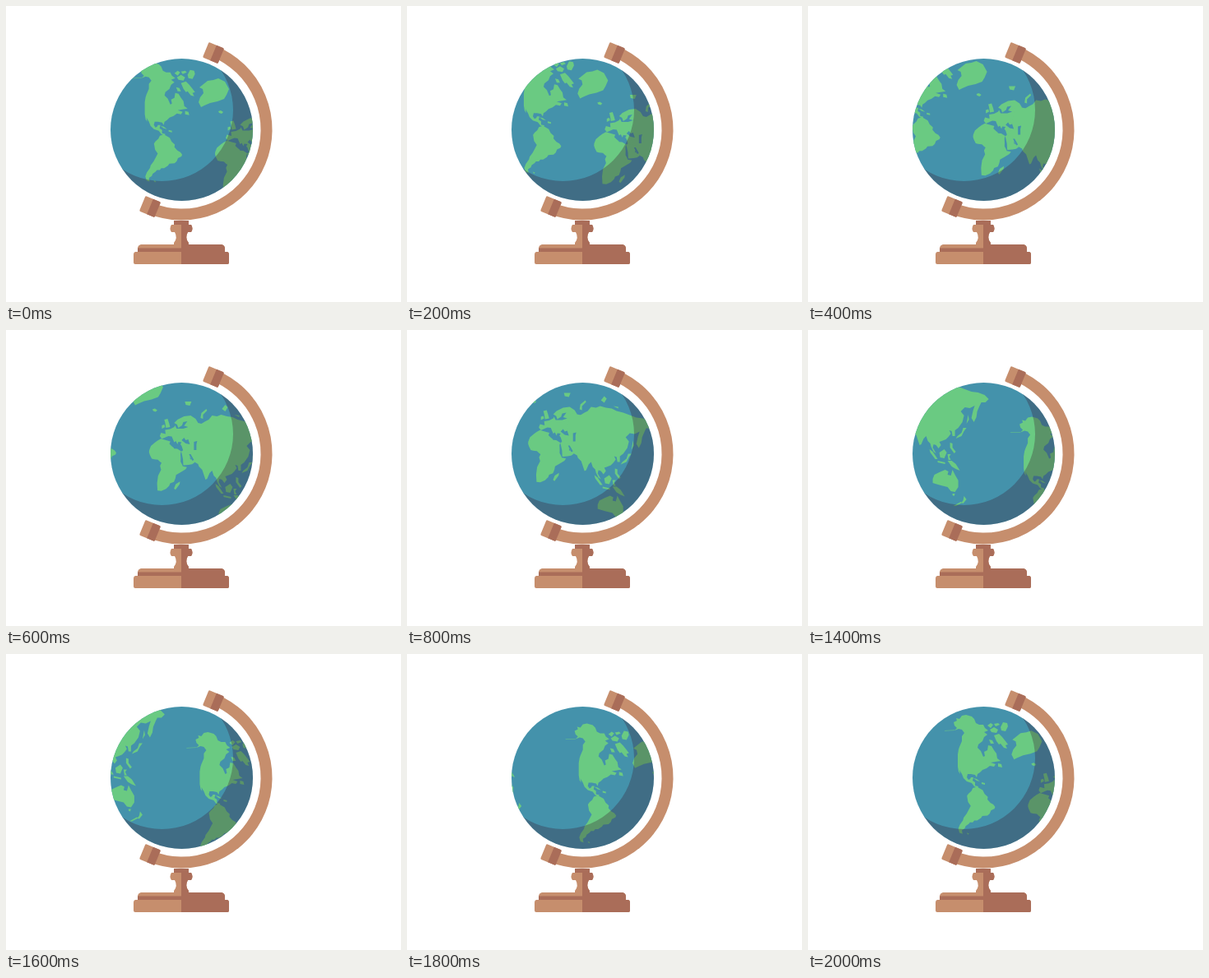
Write an HTML page that moves like this. It is 480 px wide and 360 px high and loops after 2100 ms.

```html
<!DOCTYPE html>
<html lang="en">
<head>
<meta charset="utf-8">
<title>Spinning globe</title>
<style>
html, body { margin: 0; width: 100%; height: 100%; overflow: hidden; background: #fff; }
svg { display: block; width: 480px; height: 360px; }
.sea { fill: #4492ab; }
.land { fill: #6aca82; }
.light { fill: #c68e6d; }
.dark { fill: #aa6d59; }
</style>
</head>
<body>
<svg viewBox="0 0 480 360">
  <defs>
    <clipPath id="ball"><circle cx="213.5" cy="150.5" r="86.5"/></clipPath>
    <clipPath id="right"><rect x="213" y="255" width="70" height="70"/></clipPath>
    <g id="cap">
      <rect class="light" x="-10" y="-10" width="20" height="20" rx="1.5"/>
      <path class="dark" d="M0-10H8.5Q10-10 10-8.5V8.5Q10 10 8.5 10H0Z"/>
    </g>
    <path id="stand" d="M204 261H222V266H225Q228 270.500 225 275H221Q217 282 222 288V290H262Q266 291 266 295V299H269Q271 299.500 271 302V312Q271 314 269 314H157Q155 314 155 312V302Q155 299.500 157 299H160V295Q160 291 164 290H204V288Q209 282 205 275H201Q198 270.500 201 266H204Z"/>

    <!-- data-step: the step at which a group needs no offset -->
    <g id="map" class="land">
      <g data-step="0">
        <!-- South America, in degrees -->
        <path transform="matrix(.744 .293 .3 -.763 241.9 186.4)" d="M-77 8L-72 12-62 10.500-57 6-51 4-50 0-44-3-39-3.500-35-6-35-9-39-13-39-18-41-22-48-25.500-49-29-53-34.500-57-36-58-39.500-62-41-63-44-66-48.500-66-52-69-56-68-58-66-61-71-61-75-56-75-50-73-42-73.500-38-71.500-31-70-18-76-14-81-6-80-2-77.500 3ZM-61-57L-57-57-58-59Z"/>
        <!-- Greenland, Iceland -->
        <path d="M240 95L245 91 252 90 258 88 266 92 271 101 268 108 265 113 257 116 248 118 241 121 237 123 234 117 236 111 240 106 239 101 235 99ZM258 128L261 127 264 129 262 131 259 130Z"/>
      </g>
      <g data-step="20">
        <!-- North America -->
        <path d="M177 83L181 81 180 78 184 79 187 75 192 74 199 76 202 79 204 84 208 86 213 86 215 90 219 93 214 95 218 98 214 101 212 106 207 110 206 114 210 118 213 125 215 124 214 119 218 117 219 111 223 112 226 117 229 121 230 127 234 130 228 131 222 132 228 134 226 137 221 136 217 139 212 141 209 144 206 146 205 150 203 147 198 146 194 146 193 150 195 153 197 152 198 150 201 150 200 154 203 156 203 160 207 161 206 163 202 161 199 157 193 155 189 151 187 146 184 141 185 146 183 143 182 137 182 130 182 122 183 116 184 113 187 106 187 100 190 96 187 92 183 91 178 93 181 90 178 87Z"/>
        <!-- Arctic islands, Newfoundland, Caribbean, Aleutians -->
        <path d="M218 87l4-3 3 2-3 4zM221 92l5-3 5 3-2 4-6-1zM226 85l5-1 2 2-5 2zM234 89l3-6 5 1 1 4-3 6-5-1zM226 99l6-2 4 4 4 5 3 4-3 1 2 4-4-1-4-5-2 1-3-4zM220 104l4 1 2 4-4 0zM231 133l4 1 1 4-5-1zM201 151l4 1 4 3-4-1zM211 156l4 1 0 2-4-1zM166 93l12-.6v.6l-12 .6z"/>
      </g>
      <g data-step="6">
        <!-- Africa, Madagascar, Arabia, in degrees -->
        <path transform="matrix(.688 .271 .296 -.75 181.3 162)" d="M-17 15L-16 12-13 8.500-8 4.500-4 5 2 6.500 7 4.500 9.500 4 9-1 13-6 12-16 15-27 18-33 20-37 26-35.500 32-30 35-24 35-20 40-16 40-10 39-5 44 1 50 8 51 12 44 11 42 13 38 16 36 21 33 27 32.500 31 25 32.500 20 31 19 32 15 33 10 35 10 39 0 38-6 37.500-10 33-13 28.500-17 22ZM49-12L50-16 47-26 44-25 44-18ZM32.500 31L35 28 40 21 44 13 45 13 52 16 57 19 60 23 56 25.500 51 25 48 31 44 38 36 38 34 32Z"/>
      </g>
      <g data-step="10">
        <!-- Europe -->
        <path d="M173 130L162 126 160 120 158.500 118 160 115.500 156 115 155 118 152.500 113 150 108.500 153 114 151 115.500 148 108.500 144 108 141.500 109 136 111.500 133.500 108 135 104 140.500 105.500 140 100.500 146 99.500 151 97 152 95 154 99 162 99 168 97 163 95.500 167 90 162 91 160.500 95 156 98 154.500 94 151 92 155 88 163 84 171 83 177 87 180 92 175 94 184 93 190 95 190 135Z"/>
        <!-- Asia -->
        <path d="M172 90L184 93 189 90 193 88 197 83 203 84 208 82 215 84 222 85 228 88 236 90 244 93 252 96 260 97 268 100 273 105 269 109 264 109 262 113 259 120 258 127 255 133 252 128 254 119 256 113 250 116 244 115 239 120 243 125 241 133 236 140 232 143 232 150 229 150 228 144 225 143 227 147 224 151 221 154 216 156 213 157 215 161 212 165 209 161 206 160 205 164 209 171 206 169 203 163 202 159 199 156 197 150 194 153 191 160 189 161 185 149 181 145 180 142 173 138 169 131 165 120Z"/>
        <!-- Australia, New Zealand -->
        <path d="M205 202L207 197 213 194 220 191 224 193 223 197 227 198 229 191 232 197 236 204 236 212 232 218 227 217 223 212 215 210 208 208 205 207ZM229 220l3 0-1 3-2-1zM243 223l3 4-4 5-2-1 2-3zM239 230l2 1-8 4-3 0z"/>
        <!-- Southeast Asia, Japan, Sakhalin -->
        <path d="M201 166l4 3 6 9-3 0-6-8zM211 180l9 2 0 2-9-2zM213 170l6-4 3 4-3 7-5-1zM223 172l4 0-2 3 2 4-3 0zM226 158l3 1 0 5 4 5-2 2-5-7zM223 180l5 0 5 4 5 8-5-2-5-3zM233 153L240 150 243 144 246 140 242 140 240 146 235 150ZM246 135L248 124 249 130Z"/>
        <!-- Britain, Ireland, northern islands -->
        <path d="M141 98l5-1-1-4-2-6-4 1 1 4zM136 95l3-1 1 3-4 2zM183 86l1-6 6-5 1 2-5 5 0 5zM164 66l8 0-2 5-5-1zM209 75l4-5 3 3-3 5zM224 82l6 1 0 2z"/>
        <!-- Black Sea, Caspian, Persian Gulf -->
        <path class="sea" d="M160 113L163 110 165 113 168 112 170 118 165 117ZM175 115L179 114 178 118 178 125 175 125ZM169 130L171 130 175 137 173 138Z"/>
      </g>
    </g>
  </defs>

  <g clip-path="url(#ball)">
    <rect class="sea" x="120" y="60" width="190" height="185"/>
    <g id="spin"></g>
    <path fill="#37172c" fill-opacity=".3" fill-rule="evenodd" d="M100 40H320V260H100ZM103 126.500a86.500 86.500 0 0 0 173 0a86.500 86.500 0 0 0-173 0Z"/>
  </g>

  <path d="M252.700 55.200A103 103 0 0 1 174.300 245.800" fill="none" stroke="#c68e6d" stroke-width="14"/>
  <use href="#cap" transform="translate(252 57) rotate(22.400)"/>
  <use href="#cap" transform="translate(175 244) rotate(22.400)"/>

  <use href="#stand" class="light"/>
  <path class="dark" d="M204 261h18v5h-18zM160 294.500h53v4.500h-53z"/>
  <g clip-path="url(#right)"><use href="#stand" class="dark"/></g>
</svg>
<script>
const STEPS = 21, STEP_MS = 100, DX = 13.35, DY = 5.25;
const spin = document.getElementById('spin');
const shift = n => `translate(${n * DX} ${n * DY})`;

for (const part of document.querySelectorAll('[data-step]'))
  part.setAttribute('transform', shift(+part.dataset.step));

for (const turn of [-1, 0, 1]) {
  const copy = document.createElementNS(spin.namespaceURI, 'use');
  copy.setAttribute('href', '#map');
  copy.setAttribute('transform', shift(turn * STEPS));
  spin.append(copy);
}

const start = performance.now();
function draw() {
  const step = Math.floor((performance.now() - start) / STEP_MS) % STEPS;
  spin.setAttribute('transform', shift(-step));
  requestAnimationFrame(draw);
}
draw();
</script>
</body>
</html>
```
